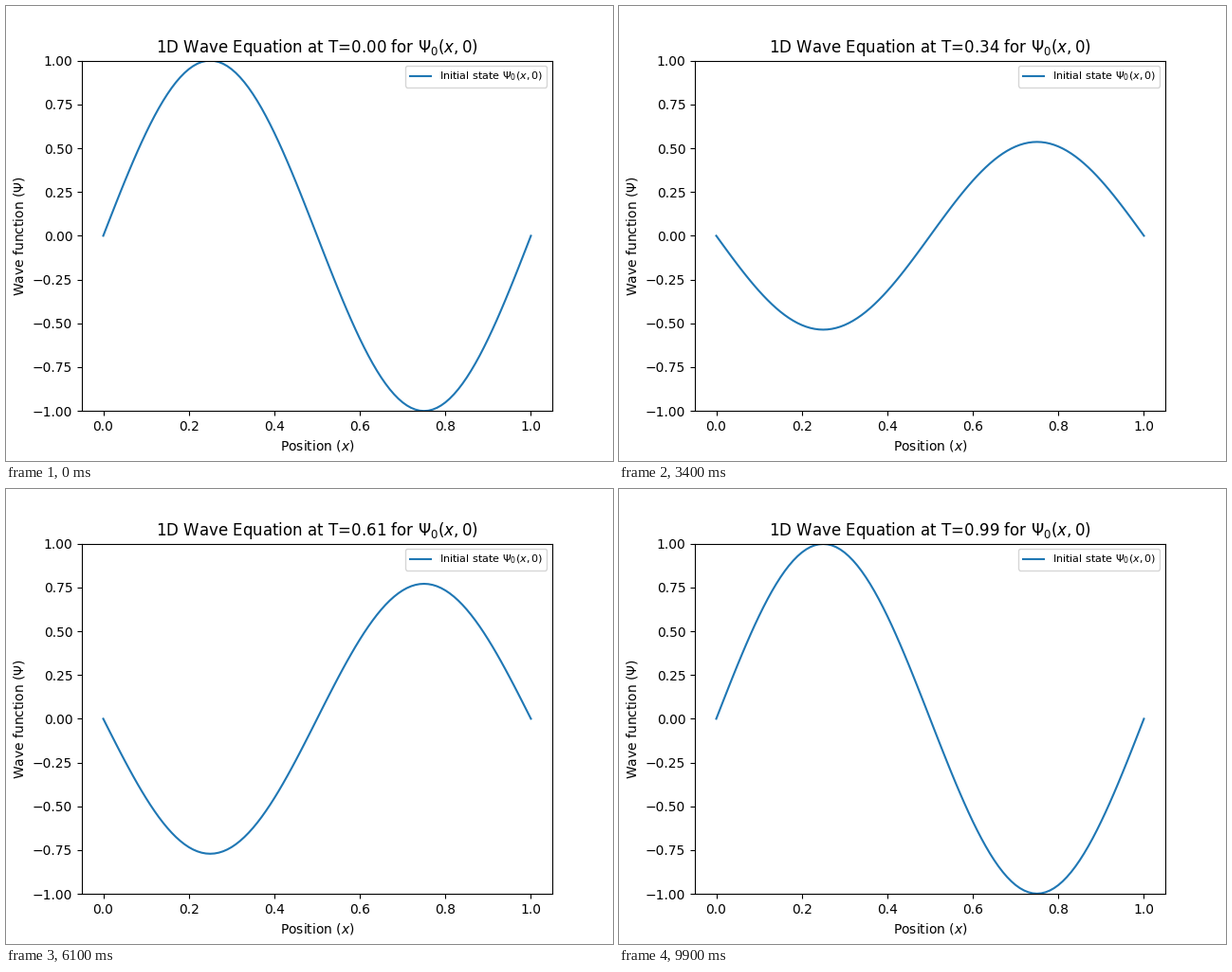
A matplotlib script for the animation above (10000 ms loop, 640 by 480 pixels).

```python
import numpy as np
import matplotlib.pyplot as plt
from matplotlib.animation import FuncAnimation

FRAMES = 100
INTERVAL = 100  # ms

plt.rcParams["font.family"] = "DejaVu Sans"

x = np.linspace(0, 1, 101)


def wave(t):
    """Standing wave with fixed ends and unit period."""
    return np.sin(2 * np.pi * x) * np.cos(2 * np.pi * t)


fig, ax = plt.subplots(figsize=(6.4, 4.8), dpi=100)
line, = ax.plot(x, wave(0), color="C0", lw=1.5,
                label=r"Initial state $\Psi_0(x,0)$")
ax.set_ylim(-1, 1)
ax.set_xlabel(r"Position ($x$)")
ax.set_ylabel(r"Wave function ($\Psi$)")
title = ax.set_title("")
# "best" moves the legend aside when the crest reaches it
ax.legend(loc="best", fontsize=8)


def update(i):
    t = i / FRAMES
    line.set_ydata(wave(t))
    title.set_text(rf"1D Wave Equation at T={t:.2f} for $\Psi_0(x,0)$")
    return line, title


anim = FuncAnimation(fig, update, frames=FRAMES, interval=INTERVAL,
                     init_func=lambda: update(0), repeat=True,
                     repeat_delay=0, blit=False)
plt.show()
```
